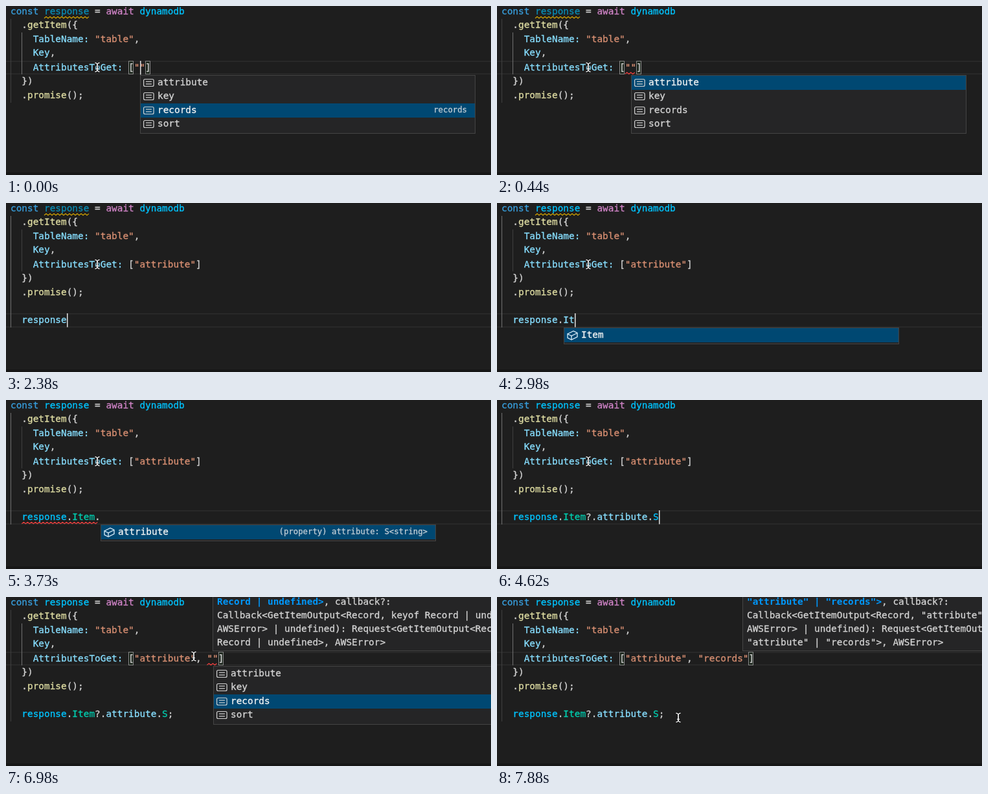
An HTML page with a canvas that plays this animation: 749 by 262 pixels, repeating every 8000 ms.

```html
<!DOCTYPE html>
<html>
<head>
<meta charset="utf-8">
<style>
html, body { margin: 0; width: 100%; height: 100%; overflow: hidden; background: #1e1e1e; }
canvas { display: block; }
</style>
</head>
<body>
<canvas id="stage" width="749" height="262"></canvas>
<script>
const g = document.getElementById('stage').getContext('2d');
const CW = 8.67, LH = 21.6, LOOP = 8000;
const colX = c => 7 + c * CW;
const lineY = n => n * LH - 1.8;
const baseline = n => 13 + Math.floor(n * 21.5) + (n > 3 ? 1 : 0);

const TEXT = '#d4d4d4', BLUE = '#389edc', CYAN = '#00c4ff', DIM = '#0a8cb4', PINK = '#cf83c6',
  FUNC = '#dedca2', PROP = '#87deff', STR = '#d88f72', TYPE = '#00ccae', RED = '#f8403f', GOLD = '#d5a600';

const listItems = ['attribute', 'key', 'records', 'sort'];
const keyList = (sel, col = 23) => ({ col, line: 4, items: listItems, sel, icon: textIcon });
const member = (col, items, detail, sel = 0) => ({ col, line: 8, items, detail, sel, icon: cubeIcon });
const hintFor = (col, keys, tail) => ({ col, lines: [
  [[keys + '>', '#0097fb', 1], [', callback?:', TEXT]],
  [['Callback<GetItemOutput<Record, ' + tail + '>,', TEXT]],
  [['AWSError> | undefined): Request<GetItemOutput<Record,', TEXT]],
  [[keys + '>, AWSError>', TEXT]]] });
const anyHint = hintFor(36, 'Record | undefined', 'keyof Record | undefined');
const keysHint = hintFor(43, '"attribute" | "records"', '"attribute" | "records"');

const resp = ['response', CYAN], item = ['Item', TYPE], dot = ['.', TEXT];
const chain = [resp, dot, item, ['?.', TEXT], ['attribute', PROP]];

// Each step changes part of the editor state at its time.
const steps = [
  [0, { arr: [['""', STR]], last: [], caret: [4, 23], cur: 4, match: 24, used: false,
        pop: { ...keyList(2), detail: 'records' }, hint: null, err: null }],
  [150, { pop: keyList(1) }],
  [290, { pop: keyList(0) }],
  [440, { caret: null, err: [4, 22, 24] }],
  [580, { caret: [4, 23] }],
  [730, { arr: [['"attribute"', STR]], caret: [4, 32], match: 33, pop: null, err: null }],
  [1180, { caret: [6, 13], cur: 6, match: 0 }],
  [1330, { caret: [7, 0], cur: 7 }],
  [1480, { caret: [8, 2], cur: 8 }],
  [1930, { last: [['re', PROP]], caret: [8, 4] }],
  [2080, { last: [['res', PROP]], caret: [8, 5],
           pop: member(5, ['response', 'Response', 'ResizeObserver', 'ResponseInit'], '') }],
  [2380, { last: [['response', PROP]], caret: [8, 10], pop: null }],
  [2530, { last: [['response', PROP], dot], caret: [8, 11],
           pop: member(11, ['$response', 'ConsumedCapacity', 'Item'], '') }],
  [2980, { last: [['response', PROP], dot, ['It', PROP]], caret: [8, 13], used: true,
           pop: member(11, ['Item'], '') }],
  [3130, { last: [['response', PROP], dot, ['Item', PROP]], caret: [8, 15], pop: null }],
  [3280, { last: [['response', PROP], dot, ['Item', PROP], dot], caret: [8, 16],
           pop: member(16, ['attribute'], '(property) attribute: S<string>') }],
  [3730, { last: [resp, dot, item, dot], caret: null, err: [8, 2, 15.6] }],
  [4030, { last: chain, caret: [8, 26], pop: null }],
  [4180, { last: [...chain, dot], caret: [8, 27], pop: member(27, ['S'], '(property) S: string') }],
  [4620, { last: [...chain, dot, ['S', CYAN]], caret: [8, 28], pop: null, err: null }],
  [4770, { last: [...chain, dot, ['S', TYPE], [';', TEXT]], caret: [8, 29] }],
  [5800, { caret: [4, 33], cur: 4 }],
  [5950, { match: 33 }],
  [6250, { arr: [['"attribute"', STR], [',', TEXT]], caret: [4, 34], match: 34 }],
  [6400, { arr: [['"attribute"', STR], [', ', TEXT]], caret: [4, 35], match: 35 }],
  [6540, { arr: [['"attribute"', STR], [', ', TEXT], ['""', STR]], caret: [4, 36], match: 37,
           pop: keyList(0, 36), hint: anyHint }],
  [6690, { pop: keyList(1, 36) }],
  [6980, { pop: keyList(2, 36), caret: null, err: [4, 35, 37] }],
  [7130, { arr: [['"attribute"', STR], [', ', TEXT], ['"records"', STR]], caret: [4, 43],
           match: 44, pop: null, err: null }],
  [7280, { hint: keysHint }],
  [7730, { caret: null }]
];

// A thin outline in the same colour gives the text its slightly heavy look.
function put(text, x, y, color, size = 14.4, bold = 0) {
  g.font = (bold ? 'bold ' : '') + size + 'px "DejaVu Sans Mono", monospace';
  g.fillStyle = g.strokeStyle = color;
  g.lineWidth = .3;
  const w = CW * size / 14.4;
  [...text].forEach((ch, i) => {
    g.fillText(ch, x + i * w, y);
    if (!bold) g.strokeText(ch, x + i * w, y);
  });
}

function putRun(parts, x, y) {
  for (const [text, color, bold] of parts) {
    put(text, x, y, color, 14.4, bold);
    x += text.length * CW;
  }
}

function rect(x, y, w, h, color) {
  g.fillStyle = color;
  g.fillRect(x, y, w, h);
}

function path(points, color, width = 1) {
  g.beginPath();
  points.forEach(([x, y]) => g.lineTo(x, y));
  g.strokeStyle = color;
  g.lineWidth = width;
  g.stroke();
}

function frame(x, y, w, h, fill, border) {
  rect(x, y, w, h, fill);
  g.strokeStyle = border;
  g.lineWidth = 1;
  g.strokeRect(x + .5, y + .5, w - 1, h - 1);
}

function squiggle([line, from, to], color) {
  const points = [], y = lineY(line) + 19.6;
  for (let x = colX(from), i = 0; x <= colX(to); x += 3, i++) points.push([x, y + (i % 2 ? -1.2 : 1.2)]);
  path(points, color, 1.2);
}

function textIcon(x, y) {
  g.strokeStyle = TEXT;
  g.lineWidth = 1.2;
  g.beginPath();
  g.roundRect(x + .6, y - 5.5, 15.5, 11, 2);
  g.stroke();
  rect(x + 4, y - 2.5, 9, 1.2, TEXT);
  rect(x + 4, y + 1.3, 9, 1.2, TEXT);
}

function cubeIcon(x, y) {
  const at = pts => path(pts.map(([a, b]) => [x + a, y + b]), '#dcecf8', 1.3);
  at([[1, -2], [10, -6.5], [16, -3.5], [16, 2.5], [7, 7], [1, 4], [1, -2], [7, 1], [16, -3.5]]);
  at([[7, 1], [7, 7]]);
}

function popup({ col, line, items, sel, detail, icon }) {
  const x = Math.ceil(colX(col)), y = Math.ceil(lineY(line + 1)), w = 518;
  frame(x, y, w, Math.round(items.length * LH + 4.2), '#252526', '#454545');
  items.forEach((name, i) => {
    const top = y + 1 + Math.floor(i * LH);
    if (i === sel) {
      rect(x + 1, top, w - 2, 22, '#004872');
      if (detail) put(detail, x + w - 13 - detail.length * 7.4, top + 14, '#c3ced6', 12.29);
    }
    icon(x + 5, top + 11);
    put(name, x + 27, top + 15, i === sel ? '#f4f4f4' : TEXT);
  });
}

function hintBox({ col, lines }) {
  const x = Math.floor(colX(col));
  frame(x, -20, 800, 104, '#252526', '#454545');
  lines.forEach((parts, i) => putRun(parts, x + 7, 12 + i * 21));
}

function pointerAt(t) {
  const part = (start, gap, n) => Math.min(n, Math.max(0, Math.floor((t - start) / gap) + 1)) / n;
  const a = part(4920, 148, 6), b = part(7580, 150, 3), out = b * (2 - b);
  return [141 + 149 * a - 10 * out, 95 - 3 * a - 240 * a * (1 - a) + 95 * out];
}

function pointer([x, y]) {
  for (const [color, width] of [['#111', 3], ['#f4f4f4', 1.3]]) {
    for (const side of [-1, 1])
      path([[x + 3.5 * side, y - 7], [x + 1.5 * side, y - 6.5], [x, y - 5],
            [x, y + 5], [x + 1.5 * side, y + 6.5], [x + 3.5 * side, y + 7]], color, width);
    path([[x - 2, y + 2.5], [x + 2, y + 2.5]], color, width);
  }
}

function draw(t) {
  const s = {};
  for (const [time, change] of steps) if (time <= t) Object.assign(s, change);

  rect(0, 0, 749, 262, '#1e1e1e');
  rect(0, 258, 749, 4, '#171717');
  rect(0, Math.round(lineY(s.cur)), 749, 1.5, '#2c2c2c');
  rect(0, Math.round(lineY(s.cur + 1)) - 1.5, 749, 1.5, '#2c2c2c');

  const inner = s.cur === 4;
  rect(7, 20, 1, (t < 1480 ? 150 : 193) - 20, inner ? '#404040' : '#707070');
  rect(24, 41, 1, 65, inner ? '#707070' : '#404040');

  if (s.match) for (const c of [21, s.match])
    frame(Math.round(colX(c)), 85, 8, 21, '#1b251b', '#888');

  const code = [
    [0, ['const ', BLUE], ['response', s.used ? CYAN : DIM], [' = ', TEXT], ['await ', PINK], ['dynamodb', CYAN]],
    [2, dot, ['getItem', FUNC], ['({', TEXT]],
    [4, ['TableName:', PROP], [' ', TEXT], ['"table"', STR], [',', TEXT]],
    [4, ['Key', PROP], [',', TEXT]],
    [4, ['AttributesToGet:', PROP], [' [', TEXT], ...s.arr, [']', TEXT]],
    [2, ['})', TEXT]],
    [2, dot, ['promise', FUNC], ['();', TEXT]],
    [0],
    [2, ...s.last]
  ];
  code.forEach(([indent, ...parts], i) => putRun(parts, colX(indent), baseline(i)));

  if (t < 3280) squiggle([0, 6, 14], GOLD);
  if (s.err) squiggle(s.err, RED);
  if (s.caret) rect(Math.ceil(colX(s.caret[1])), Math.round(lineY(s.caret[0])), 1.5, 21.5, '#e0e0e0');
  if (s.pop) popup(s.pop);
  if (s.hint) hintBox(s.hint);
  pointer(pointerAt(t));
}

let start;
function tick(now) {
  start ??= now;
  draw((now - start) % LOOP);
  requestAnimationFrame(tick);
}
requestAnimationFrame(tick);
</script>
</body>
</html>
```
